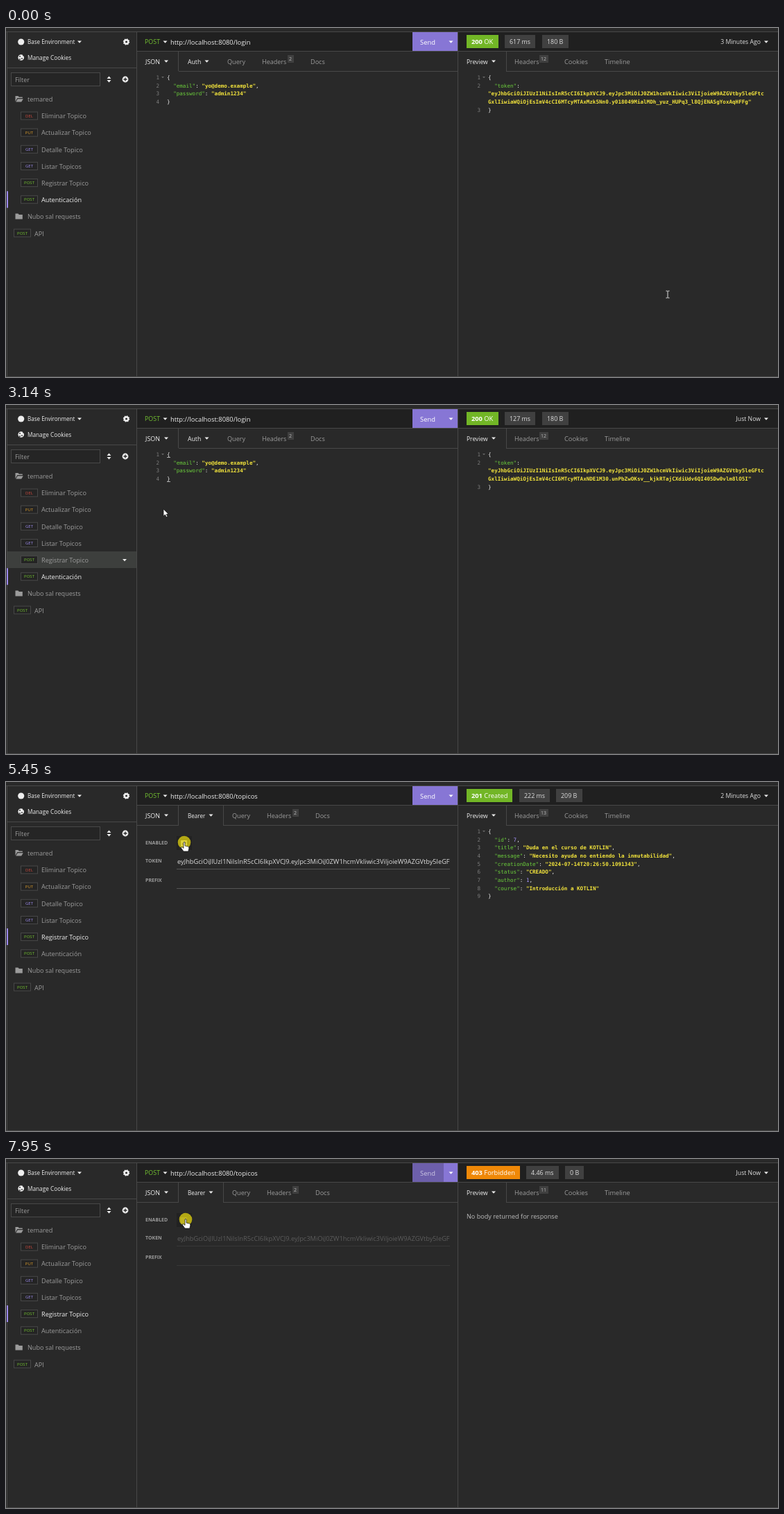
Recreate the animation shown at these times as an HTML page. Size 1113 by 503 pixels, loop 8 s.

```html
<!DOCTYPE html>
<html lang="es">
<head>
<meta charset="utf-8">
<title>API client</title>
<style>
html, body { margin: 0; width: 100%; height: 100%; overflow: hidden; background: #292929; }
svg { display: block; width: 100vw; height: 100vh; font-family: "Open Sans", "Noto Sans", sans-serif; }
.code { font: 7.6px "DejaVu Sans Mono", monospace; }
.b { font-weight: bold; }
</style>
</head>
<body>
<svg viewBox="0 0 1113 503">
  <defs><clipPath id="field"><rect x="246" y="100" width="394" height="30"/></clipPath></defs>
  <g id="base"></g>
  <g id="live"></g>
  <g id="pointer"></g>
</svg>
<script>
const LOOP = 8000;
const GREEN = '#74c331', PURPLE = '#8776d5', LILAC = '#9d8bf0', WHITE = '#eee', GREY = '#9b9b9b', LINE = '#484848';
const HEAD = 'eyJhbGciOiJIUzI1NiIsInR5cCI6IkpXVCJ9.eyJpc3MiOiJ0ZW1hcmVkIiwic3ViIjoieW9AZGVtby5leGFtc';
const TAIL = 'GxlIiwiaWQiOjEsImV4cCI6MTcyMTAx';
const SIGNED = ['Mzk5Nn0.y018049MialMDh_yuz_HUPq3_l8QjENASgYoxAqHFFg', 'NDE1M30.unPbZwOKsv__kjkRTajCXdiUdv6QI405Dw0vlm8lO5I'];

const $ = id => document.getElementById(id);
const rect = (x, y, w, h, fill, more = '') => `<rect x="${x}" y="${y}" width="${w}" height="${h}" fill="${fill}" ${more}/>`;
const text = (x, y, s, size, fill = WHITE, more = '') => `<text x="${x}" y="${y}" font-size="${size}" fill="${fill}" ${more}>${s}</text>`;
const path = (d, fill, more = '') => `<path d="${d}" fill="${fill}" ${more}/>`;
const circle = (x, y, r, fill, more = '') => `<circle cx="${x}" cy="${y}" r="${r}" fill="${fill}" ${more}/>`;
const caret = (x, y, fill = WHITE, r = 3) => path(`M${x - r} ${y - r / 2}h${2 * r}l${-r} ${r * 1.1}z`, fill);
const span = (s, fill, bold) => `<tspan fill="${fill}"${bold ? ' class="b"' : ''}>${s}</tspan>`;
const hline = (x, y, w, fill = LINE) => rect(x, y, w, 1, fill);
const vline = (x, y, h, fill = LINE) => rect(x, y, 1, h, fill);

// Each line: [number, indent, key, value, ending]
function code(x, lines) {
  return lines.map(([n, indent, key, val, end = ''], i) => {
    const y = 74 + i * 11.65;
    const body = (key ? span(`"${key}"`, '#6ccf3c') + ': ' : '') +
      (val ? span(val, /^\d$/.test(val) ? '#a896ff' : '#f4e53c', !/^\d$/.test(val)) : '') + end;
    return text(x - 11, y, n, 7.6, '#7c7c7c', 'class="code" text-anchor="end"') +
      (n === 1 ? caret(x - 6, y - 3, '#666', 2) : '') +
      text(x + indent * 4.575, y, body, 7.6, WHITE, 'class="code"');
  }).join('');
}

function object(x, fields) {
  const rows = fields.map(([k, v], i) => [i + 2, 2, k, v, i < fields.length - 1 ? ',' : '']);
  return code(x, [[1, 0, '', '', '{'], ...rows, [fields.length + 2, 0, '', '', '}']]);
}

function badge(x, y, method) {
  const fill = { DEL: '#cf4a3e', PUT: '#d99a2b', GET: LILAC, POST: GREEN }[method];
  return rect(x + .5, y - 5.5, 24, 11, '#242424', `stroke="${LINE}"`) +
    text(x + 12.5, y + 2.2, method, 6, fill, 'text-anchor="middle"');
}

const ITEMS = [['DEL', 'Eliminar Topico'], ['PUT', 'Actualizar Topico'], ['GET', 'Detalle Topico'],
  ['GET', 'Listar Topicos'], ['POST', 'Registrar Topico'], ['POST', 'Autenticación']];

function base() {
  const folder = (y, open) => path(`M13.5 ${y - 4}h4l1.3 1.5h5v${open ? 1.5 : 6.5}h${open ? -7.5 : -10.3}${open ? 'l-2.8 5' : ''}z`, GREY) +
    (open ? path(`M16.8 ${y + .2}h8l-2.6 4.3h-8z`, GREY) : '');
  return rect(0, 0, 1113, 503, '#292929') + rect(189, 6, 924, 27, '#202020') +
    hline(0, 5, 1113) + hline(0, 502, 1113) + vline(1, 5, 498) + vline(188, 5, 498) + vline(651, 5, 498) +
    hline(189, 33, 924) + hline(2, 57, 186) +
    circle(21.7, 20, 4.6, WHITE) + text(31, 23, 'Base Environment', 8.05) + caret(106, 20) +
    circle(173.5, 20, 2.7, 'none', 'stroke="#eee" stroke-width="2.4"') +
    circle(173.5, 20, 4, 'none', 'stroke="#eee" stroke-width="1.4" stroke-dasharray="1.6 1.54"') +
    circle(21.7, 42.5, 4.3, WHITE) + [[20, 41], [23, 44], [20, 45], [25, 39.5]].map(([x, y]) => circle(x, y, .9, '#292929')).join('') +
    text(31, 45.5, 'Manage Cookies', 8.25) +
    rect(7.5, 64.5, 128, 19, '#252525', `stroke="${LINE}"`) + text(13, 77.5, 'Filter', 8.9, GREY) +
    path('M145.5 73l3-3.5 3 3.5zM145.5 75l3 3.5 3-3.5z', WHITE) +
    circle(172, 74, 4.4, WHITE) + path('M172 71.5v5M169.5 74h5', 'none', 'stroke="#292929" stroke-width="1.3"') +
    folder(102, true) + text(31, 106, 'temared', 9.2, GREY) +
    folder(271.5, false) + text(31, 275, 'Nubo sal requests', 9.1, GREY) +
    badge(11, 295.5, 'POST') + text(41, 299.5, 'API', 9.1, GREY) +
    text(200, 23, 'POST', 8.9, GREEN) + caret(229.5, 20);
}

function sidebar(active, hover) {
  const row = hover ? rect(2, 211, 186, 24, '#3d3f3d') + caret(171, 223.5) : '';
  return row + rect(1, 211 + (active - 4) * 24.2, 2, 24, LILAC) + ITEMS.map(([method, name], i) => {
    const y = 126.5 + i * 24.15;
    return badge(21, y, method) + text(51, y + 3.7, name, 9.15, i === active ? WHITE : GREY);
  }).join('');
}

const count = (x, n) => rect(x, 39, n > 9 ? 13 : 9, 11, '#404040') + text(x + 2, 47.2, n, 7, '#bbb');

function requestTabs(topic, bearer, hover) {
  const x = topic ? 326 : 319, edge = bearer ? 313 : 249;
  return (hover ? rect(249, 34, 65, 28, '#4a4a4a') : '') +
    text(201, 51.5, 'JSON', 9) + caret(231, 48) +
    text(262, 51.5, topic ? 'Bearer' : 'Auth', topic ? 8.1 : 8.7) + caret(topic ? 295.5 : 289.5, 48) +
    text(x, 52, 'Query', 9.1, GREY) + text(x + 50, 52, 'Headers', 9, GREY) + count(x + 87, 2) + text(x + 120, 52, 'Docs', 9.1, GREY) +
    vline(248, 34, 28) + (bearer ? vline(313, 34, 28) + hline(189, 62, 60) : '') + hline(edge, 62, 651 - edge);
}

function authPanel(on, hover) {
  const label = (y, s) => text(201, y, s, 7, GREY, 'class="b"');
  const rule = on ? '#555' : '#383838';
  return label(90, 'ENABLED') + label(116, 'TOKEN') + label(144, 'PREFIX') +
    (hover ? rect(246, 78, 22, 20, '#222') : '') +
    rect(252, 84, 9, 9, on ? WHITE : '#606060', 'rx="1"') +
    (on ? path('M254 88.5l2 2 3.4-4', 'none', 'stroke="#292929" stroke-width="1.3"') : '') +
    text(247, 118, HEAD + TAIL, 9.25, on ? '#ddd' : '#5c5c5c', 'clip-path="url(#field)"') +
    hline(246, 125, 394, rule) + hline(246, 153, 394, rule);
}

const token = i => code(695, [[1, 0, '', '', '{'], [2, 2, 'token', ''], ['', 0, '', '"' + HEAD],
  ['', 0, '', TAIL + SIGNED[i] + '"'], [3, 0, '', '', '}']]);

const TITLE = '"Duda en el curso de KOTLIN"', MESSAGE = '"Necesito ayuda no entiendo la inmutabilidad"', COURSE = '"Introducción a KOTLIN"';
const topicBody = [['title', TITLE], ['message', MESSAGE], ['course', COURSE]];
const topicReply = [['id', '7'], ['title', TITLE], ['message', MESSAGE], ['creationDate', '"2024-07-14T20:26:50.1091343"'],
  ['status', '"CREADO"'], ['author', '1'], ['course', COURSE]];

// Pill columns: x, width, label
const REPLIES = [
  { code: '200', word: 'OK', w: 46, pills: [[719, 44, '617 ms'], [773, 38, '180 B']], ago: '3 Minutes Ago', headers: 12, body: token(0) },
  { code: '200', word: 'OK', w: 46, pills: [[719, 44, '127 ms'], [773, 38, '180 B']], ago: 'Just Now', headers: 12, body: token(1) },
  { code: '201', word: 'Created', w: 66, pills: [[740, 44, '222 ms'], [793, 38, '209 B']], ago: '2 Minutes Ago', headers: 13, body: object(695, topicReply) },
  { code: '403', word: 'Forbidden', w: 77, fill: '#ef8807', pills: [[750, 47, '4.46 ms'], [806, 27, '0 B']], ago: 'Just Now', headers: 11,
    body: text(664, 85.5, 'No body returned for response', 9.1, '#bbb') }
];

function response(r) {
  return rect(664, 10, r.w, 19, r.fill || '#72b626') +
    text(671, 23.3, span(r.code, '#fff', true) + ' ' + r.word, 9.3, '#fff') +
    r.pills.map(([x, w, s]) => rect(x, 10, w, 19, '#404040') + text(x + 7, 23.3, s, 8.9, '#ddd')).join('') +
    text(1088, 23, r.ago, 8.7, '#ddd', 'text-anchor="end"') + caret(1096, 20) +
    text(664, 51.5, 'Preview', 8.5) + caret(703, 48) + vline(721, 34, 28) + hline(721, 62, 392) +
    text(733, 52, 'Headers', 9.1, GREY) + count(769, r.headers) +
    text(805, 52, 'Cookies', 9.3, GREY) + text(863, 52, 'Timeline', 9.25, GREY) + r.body;
}

function sendButton(dark) {
  return rect(586, 6, 45, 27, dark ? '#6d5fab' : PURPLE) + rect(631, 6, 20, 27, PURPLE) +
    text(597, 23.5, 'Send', 9.4, dark ? '#cdc8e4' : '#fff') + caret(641.5, 20, '#fff');
}

const between = (t, a, b) => t >= a && t < b;

function scene(t) {
  const topic = t >= 3260, bearer = t >= 4220;
  const overBox = between(t, 5250, 6000) || t >= 7820;
  const left = bearer ? authPanel(t < 5500, overBox) : topic ? object(232, topicBody)
    : object(232, [['email', '"yo@demo.example"'], ['password', '"admin1234"']]) +
      (t >= 700 ? hline(232, 75, 5, '#aaa') + hline(232, 110, 5, '#aaa') : '');
  const reply = t < 1480 ? 0 : t < 3260 ? 1 : t < 6340 ? 2 : 3;
  return sidebar(topic ? 4 : 5, between(t, 2860, 3260)) +
    text(237, 23.5, 'http://localhost:8080/' + (topic ? 'topicos' : 'login'), 9.4) +
    sendButton(between(t, 850, 1700) || t >= 6000) +
    requestTabs(topic, bearer, between(t, 4080, 4800)) + left + response(REPLIES[reply]);
}

// Pointer stops: time, x, y
const STOPS = [[0, 954, 384], [60, 954, 384], [130, 803, 190], [320, 803, 190], [900, 620, 26], [1400, 620, 26], [1890, 722, 72],
  [1970, 722, 72], [2760, 75, 243], [2830, 75, 243], [2960, 90, 226], [3140, 227, 150], [3610, 278, 50], [4200, 278, 50],
  [4700, 312, 98.5], [4830, 285, 93], [4900, 285, 93], [5250, 257, 87], [5500, 257, 87], [5850, 633, 30], [6180, 618, 26],
  [6320, 618, 26], [6450, 644, 62.5], [6930, 606, 80], [7080, 606, 80], [7880, 259, 87], [8000, 259, 87]];
const CLICKS = [1290, 2960, 4090, 5400, 6200, 7940];

function place(t) {
  const i = STOPS.findIndex(s => s[0] > t), [t0, x0, y0] = STOPS[i - 1], [t1, x1, y1] = STOPS[i];
  const u = (t - t0) / (t1 - t0), k = u * u * (3 - 2 * u);
  return [x0 + (x1 - x0) * k, y0 + (y1 - y0) * k];
}

function pointer(t) {
  const [x, y] = place(t);
  const hand = x < 188 || (y < 34 && between(x, 586, 652)) || (between(y, 34, 62) && x < 460) ||
    (between(x, 246, 268) && between(y, 78, 98));
  const edge = 'stroke="#111" stroke-width=".7" stroke-linejoin="round"';
  const shape = hand ? path('M-1 0Q0-1.2 1 0V5L5.5 6Q7 6.5 6.8 8.5L5.8 13H-1L-4.6 8Q-4.6 6.3-3 6.7L-1 8.5Z', '#fff', edge)
    : x > 695 && y > 62 ? path('M-2.5-5H-.5L0-4.5.5-5H2.5M0-4.5V4.5M-2.5 5H-.5L0 4.5.5 5H2.5', 'none', 'stroke="#ddd"')
    : path('M0 0V10.2L2.4 8 4.1 11.6 5.9 10.8 4.2 7.3H7.3Z', '#fff', edge);
  const ring = CLICKS.some(c => between(t, c, c + 130)) ? circle(0, 0, 9.3, '#d8cb12', 'opacity=".8"') : '';
  return `<g transform="translate(${x} ${y})">${ring}${shape}</g>`;
}

$('base').innerHTML = base();
let shown;
function frame() {
  const t = performance.now() % LOOP, next = scene(t);
  if (next !== shown) $('live').innerHTML = shown = next;
  $('pointer').innerHTML = pointer(t);
  requestAnimationFrame(frame);
}
frame();
</script>
</body>
</html>
```
